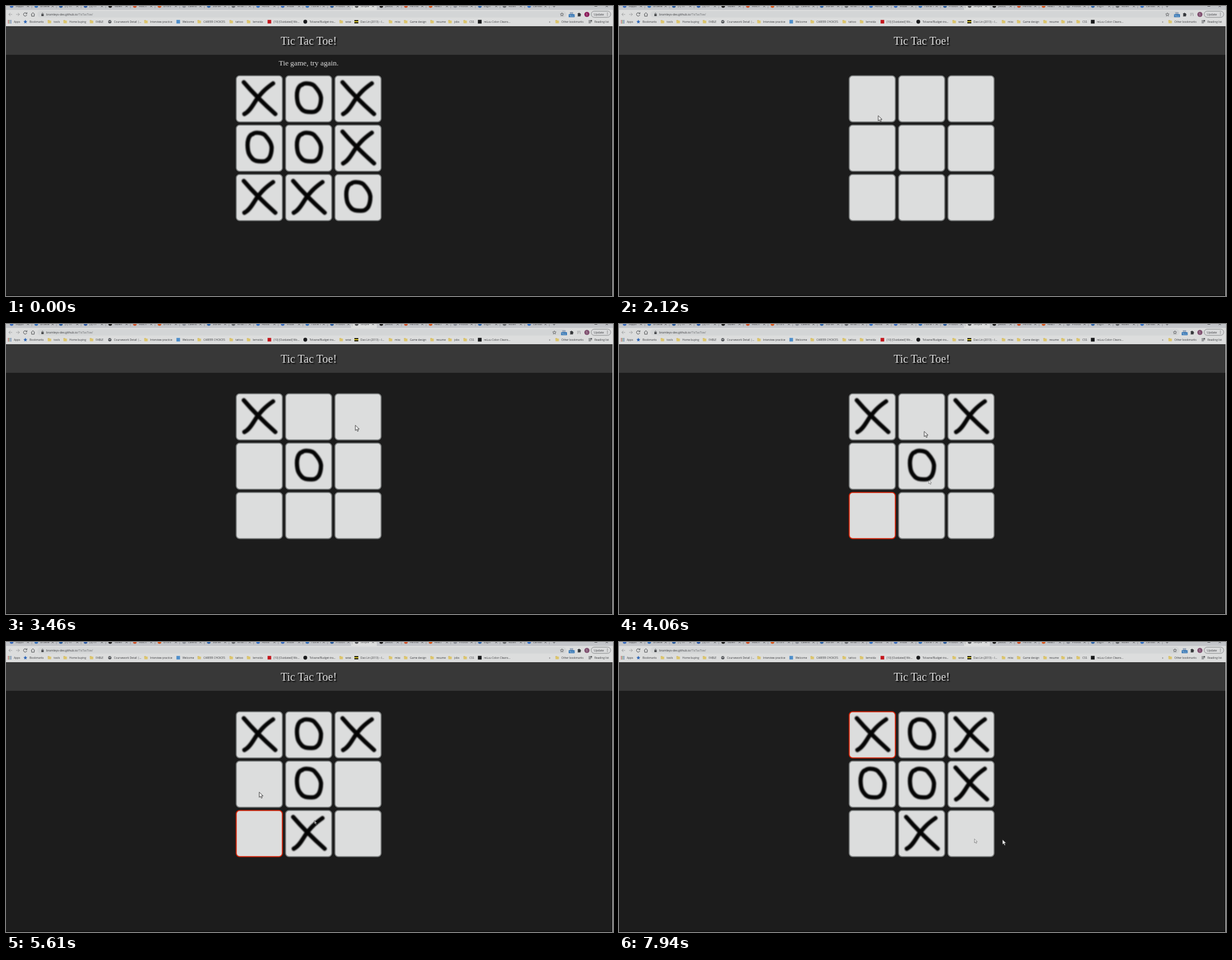
An HTML page that plays this animation: 1082x517 px, repeating every 8 s.

```html
<!DOCTYPE html>
<html lang="en">
<head>
<meta charset="utf-8">
<title>Tic Tac Toe</title>
<style>
  html, body { margin: 0; width: 100%; height: 100%; overflow: hidden; background: #1c1c1c; }
  svg { display: block; width: 1082px; height: 517px; }
  text { font-family: "Open Sans", sans-serif; font-size: 4.8px; fill: #3c3d40; white-space: pre; }
  .page { font-family: "Liberation Serif", serif; fill: #dedede; text-anchor: middle; }
  h1, .title { font-size: 20px; text-shadow: 2px 2px 2px #000; }
  .message { font-size: 13.33px; }
  .line { fill: none; stroke: #45474a; stroke-width: .9; }
  .cell { fill: #dcdddd; stroke: #787b7b; stroke-width: 1.8; }
  .cell.lit { stroke: #d62206; }
  .mark { fill: none; stroke: #050505; stroke-width: 7.6; stroke-linecap: round; stroke-linejoin: round; filter: blur(.9px); }
</style>
</head>
<body>
<svg id="stage" viewBox="0 0 1082 517"></svg>
<script>
const stage = document.getElementById('stage');
const LOOP = 8000, RESET = 1790;

const rect = (x, y, w, h, fill, more = '') => `<rect x="${x}" y="${y}" width="${w}" height="${h}" fill="${fill}" ${more}/>`;
const dot = (x, y, r, fill) => `<circle cx="${x}" cy="${y}" r="${r}" fill="${fill}"/>`;
const label = (x, y, text, more = '') => `<text x="${x}" y="${y}" ${more}>${text}</text>`;
const line = (d, more = '') => `<path class="line" d="${d}" ${more}/>`;

// Browser chrome
const icons = {
  folder: x => rect(x - 3, 25.2, 3, 2, '#d0b557') + rect(x - 3, 25.9, 6, 4.8, '#dcc56d', 'rx=".5"'),
  apps: x => [0, 1, 2, 3, 4, 5, 6, 7, 8].map(i =>
    rect(x - 3 + i % 3 * 2.3, 25 + (i / 3 | 0) * 2.3, 1.5, 1.5, ['#b9534b', '#5a8a5c', '#4f74b5'][i % 3])).join(''),
  star: x => `<path d="M${x} 24.6l1 2.2 2.4.3-1.8 1.6.5 2.4-2.1-1.2-2.1 1.2.5-2.4-1.8-1.6 2.4-.3z" fill="#2f67b8"/>`,
  globe: x => dot(x, 28, 3, '#55585c') + line(`M${x - 2.5} 27q2.5 2 5-.6`, 'style="stroke:#ccc"'),
  blue: x => rect(x - 3.2, 24.8, 6.4, 6.4, '#4f8fcb'),
  red: x => rect(x - 3.2, 24.8, 6.4, 6.4, '#c4161c'),
  black: x => dot(x, 28, 3.4, '#191a1c'),
  dark: x => rect(x - 3.3, 24.7, 6.6, 6.6, '#17181a'),
  film: x => rect(x - 3.5, 25, 7, 6, '#25230f') + rect(x - 3.5, 27, 7, 1.8, '#d8c526'),
  list: x => line(`M${x - 3} 26h5M${x - 3} 28h6M${x - 3} 30h4`) + rect(x + 1, 25, 2, 2, '#45474a'),
  none: () => ''
};
const bookmarks = [
  [14, 'Apps', 'apps'], [42, 'Bookmarks', 'star'], [85, 'tools'], [113, 'Home buying'], [160, 'FABLE'],
  [192.5, 'Coursework Detail |...', 'globe'], [257, 'Interview practice'], [314.5, 'Welcome', 'blue'],
  [352, 'CAREER CHOICES'], [409, 'tattoo'], [440, 'lernvida'], [477, '(10) [Outdated] Wo...', 'red'],
  [541, 'Tolvane/Budget-tra...', 'black'], [605, 'wow'], [632, 'Dao Lin (2013) – I...', 'film'], [693, 'misc'],
  [720, 'Game design'], [767, 'resume'], [799, 'jobs'], [826, 'CSS'], [852, 'reLuu Colon Cleans...', 'dark'],
  [968, '»', 'none'], [990, 'Other bookmarks'], [1049, 'Reading list', 'list']
];
const tabs = ['Suppo', 'Browse', '(1) Th', '(5) Th', 'Tables', 'Watch', 'Errors', 'Calend', 'Starter', 'What ...', 'About',
  'Visual', 'Home 1', 'Photos', 'Simple', 'JavaSc', 'Permis', 'React', 'Photos', 'Login', 'Notes', 'Canvas', 'Budget'];
const tabColors = ['#3d6fc0', '#3873bd', '#2e5f9f', '#315ea8', '#222', '#d0542b', '#d95a20', '#8d9199', '#3469ac', '#6b6e72', '#3975c7'];

function tabStrip() {
  let out = rect(0, 0, 1082, 7, '#c3c5c9') + rect(615, 0, 46, 8, '#dcdddd', 'rx="2"');
  tabs.forEach((name, i) => {
    if (i > 21) return;
    const x = 10 + i * 43.93;
    out += dot(x, 0, 3.2, i === 14 ? '#57595c' : tabColors[i % 11]) + label(x + 7, 1.8, name) +
      line(`M${x + 27.5}-1.5l3.4 3.4m0-3.4l-3.4 3.4`) + (i === 14 ? '' : line(`M${x + 36} 0v4`, 'opacity=".35"'));
  });
  return out + line('M974.5 0h5M977-2v4.5') + line('M1049 .5h5M1069-2l4 4m0-4l-4 4');
}

function toolButtons(playing) {
  const dx = playing ? -13.5 : 0;
  const star = `M${991 + dx} 12l.9 2 2.2.2-1.7 1.5.5 2.2-1.9-1.2-1.9 1.2.5-2.2-1.7-1.5 2.2-.2z`;
  return `<g id="${playing ? 'toolsPlaying' : 'toolsIdle'}">` + line(star, 'style="stroke-width:.7"') +
    rect(1005 + dx, 11, 6, 4, '#9caabd') + rect(1003 + dx, 14.7, 10.5, 5.3, '#2e73b5') +
    label(1004.2 + dx, 18.9, 'New', 'style="fill:#e4e7ea;font-size:4px"') +
    `<path d="M${1019 + dx} 13h1.6q.8-2.4 1.8 0h1.8v1.8q2.2.8 0 1.8v1.9h-5.2v-1.7q1.8-.9 0-1.8z" fill="#36383b"/>` +
    (playing ? line('M1018 13h6M1018 15h4M1018 17h2.5M1023.5 14v4', 'opacity=".45"') : '') + '</g>';
}

function browser() {
  return rect(0, 0, 1082, 36, '#dcdddd') + tabStrip() +
    rect(56, 9, 943, 11.5, '#d3d5d6', 'rx="5.7"') +
    line('M11 15H5m2.8-2.8L5 15l2.8 2.8M18 15h6m-2.8-2.8L24 15l-2.8 2.8', 'opacity=".4"') +
    line('M36.6 13.2a3 3 0 1 0 .5 2.6M37.3 11.4v2.4h-2.4') + line('M44.7 15L48 11.8 51.3 15M45.7 14.4v3.8h4.6v-3.8') +
    rect(63, 14.3, 4.2, 3.6, '#4a4c4f', 'rx=".5"') + line('M63.9 14.3v-1q1.2-2 2.4 0v1', 'style="stroke-width:.7"') +
    label(71.5, 16.7, 'bramleys-dev.github.io<tspan fill="#6b6d70">/TicTacToe/</tspan>', 'style="font-size:5.3px"') +
    toolButtons(false) + toolButtons(true) +
    `<circle id="avatar" cx="1035.5" cy="15" r="4.6"/>` + label(1034, 16.7, 'S', 'style="fill:#ddd"') +
    rect(1043, 9.2, 35, 11, '#d9dadb', 'rx="5.5" stroke="#77797c" stroke-width=".8"') +
    label(1048, 16.6, 'Update', 'style="font-size:5.2px"') + [12.3, 14.7, 17.1].map(y => dot(1072, y, .6, '#444')).join('') +
    bookmarks.map(([x, name, icon = 'folder']) => icons[icon](x - 7.5) + label(x, 29.8, name)).join('');
}

// Game board
const finalBoard = 'XOXOOXXXO';
const shapes = {
  X: 'M14.5 12.5Q37 39 70.5 69M66.5 14.5C50 26 44 34 38 42S26 64 15.5 69',
  O: 'M39.5 14.5Q50 15 54 21Q63 31 64 40Q64 52 60 59Q55 66 47.5 65.5Q36 66 30.5 61.5Q23 54 22 46Q20 34 22.5 26Q25 18 30 17Q33 14 39.5 14.5Z'
};
const board = [...finalBoard].map((mark, i) =>
  `<g transform="translate(${409.5 + i % 3 * 88} ${123.5 + (i / 3 | 0) * 88})">` +
  `<rect class="cell" x=".9" y=".9" width="82.2" height="82.2" rx="6"/><path class="mark" d="${shapes[mark]}"/></g>`).join('');

const arrow = '<path d="M0 0V9.3L2.2 7.3 3.8 10.8 5.5 10 4 6.7H7Z" fill="#f2f2f2" stroke="#222" stroke-width=".8"/>';

stage.innerHTML = rect(0, 0, 1082, 517, '#1c1c1c') + browser() + rect(0, 36, 1082, 51, '#383838') +
  rect(0, 515, 1082, 2, '#121212') + rect(1081, 36, 1, 481, '#c8c8c8') +
  label(539.5, 69, 'Tic Tac Toe!', 'class="page title"') +
  label(539.5, 106, 'Tie game, try again.', 'class="page message" id="message"') + board +
  `<g id="trail" opacity=".65">${arrow}</g>` +
  `<g id="cursor"><circle id="click" cx="0" cy="1.5" r="5.5" fill="#f2e52c" opacity=".9"/>${arrow}</g>`;

const get = id => document.getElementById(id);
const [message, trail, cursor, click, avatar, toolsIdle, toolsPlaying] =
  ['message', 'trail', 'cursor', 'click', 'avatar', 'toolsIdle', 'toolsPlaying'].map(get);
const cells = [...stage.querySelectorAll('.cell')], marks = [...stage.querySelectorAll('.mark')];

// Timeline: when each cell is filled, and the cells lit while the computer is choosing
const filledAt = [2250, 4750, 3700, 6330, 3110, 7150, Infinity, 5300, Infinity];
const turns = [[2250, 3110, '3158206'], [3700, 4750, '18637042'], [5300, 6330, '50618273'], [7150, LOOP, '4725180']];
const clicks = [1690, 2250, 3700, 5300, 7150];
const path = [
  [190, 1036, 510], [390, 864, 459], [590, 864, 459], [1390, 504, 259], [1460, 490, 238], [1660, 462, 195.5],
  [2250, 462, 195.5], [2450, 576, 183], [2660, 478.5, 210.5], [3120, 520, 205], [3500, 625, 180], [3720, 627, 182],
  [3920, 552, 278], [4060, 544, 191.5], [4800, 547, 200], [5180, 549.5, 318], [5320, 549.5, 318], [5610, 451, 267.5],
  [6540, 451, 267.5], [6780, 603, 277.5], [6940, 587.5, 292], [7120, 620, 258], [7200, 620, 258],
  [7700, 633.5, 351], [7940, 683.5, 352], [8000, 686, 352]
];
const trails = [[2530, 3120, 576.5, 183.5], [3990, 4750, 552, 278], [5400, 6330, 549.5, 318],
  [6850, 7150, 603, 277.5], [7780, LOOP, 633.5, 351]];

const show = (el, on) => { el.style.display = on ? '' : 'none'; };
const place = (el, x, y, scale = 1) => el.setAttribute('transform', `translate(${x} ${y}) scale(${scale})`);

function cursorAt(t) {
  const next = Math.max(1, path.findIndex(p => p[0] >= t));
  const [t0, x0, y0] = path[next - 1], [t1, x1, y1] = path[next];
  let u = Math.min(1, Math.max(0, (t - t0) / (t1 - t0)));
  u = u * u * (3 - 2 * u);
  return [x0 + (x1 - x0) * u, y0 + (y1 - y0) * u];
}

function render(t) {
  const step = Math.min(LOOP, Math.floor((t + 12) * 3 / 200) * 200 / 3);
  const turn = turns.find(([from, to]) => t >= from && t < to);
  const lit = turn ? +turn[2][Math.floor((t - turn[0]) / 130)] : -1;
  cells.forEach((cell, i) => cell.classList.toggle('lit', i === lit));
  marks.forEach((mark, i) => show(mark, t < RESET || t >= filledAt[i]));
  show(message, t < RESET);

  const playing = t >= 1850 && t < 3500;
  show(toolsPlaying, playing);
  show(toolsIdle, !playing);
  avatar.setAttribute('fill', t < RESET ? '#8c1d5b' : '#805070');

  show(cursor, t >= 190);
  place(cursor, ...cursorAt(step));
  show(click, clicks.some(c => Math.abs(t - c) < 100));
  const ghost = trails.find(([from, to]) => t >= from && t < to);
  show(trail, ghost);
  if (ghost) place(trail, ghost[2], ghost[3], .75);
}

function tick(now) {
  render(now % LOOP);
  requestAnimationFrame(tick);
}
render(0);
requestAnimationFrame(tick);
</script>
</body>
</html>
```
